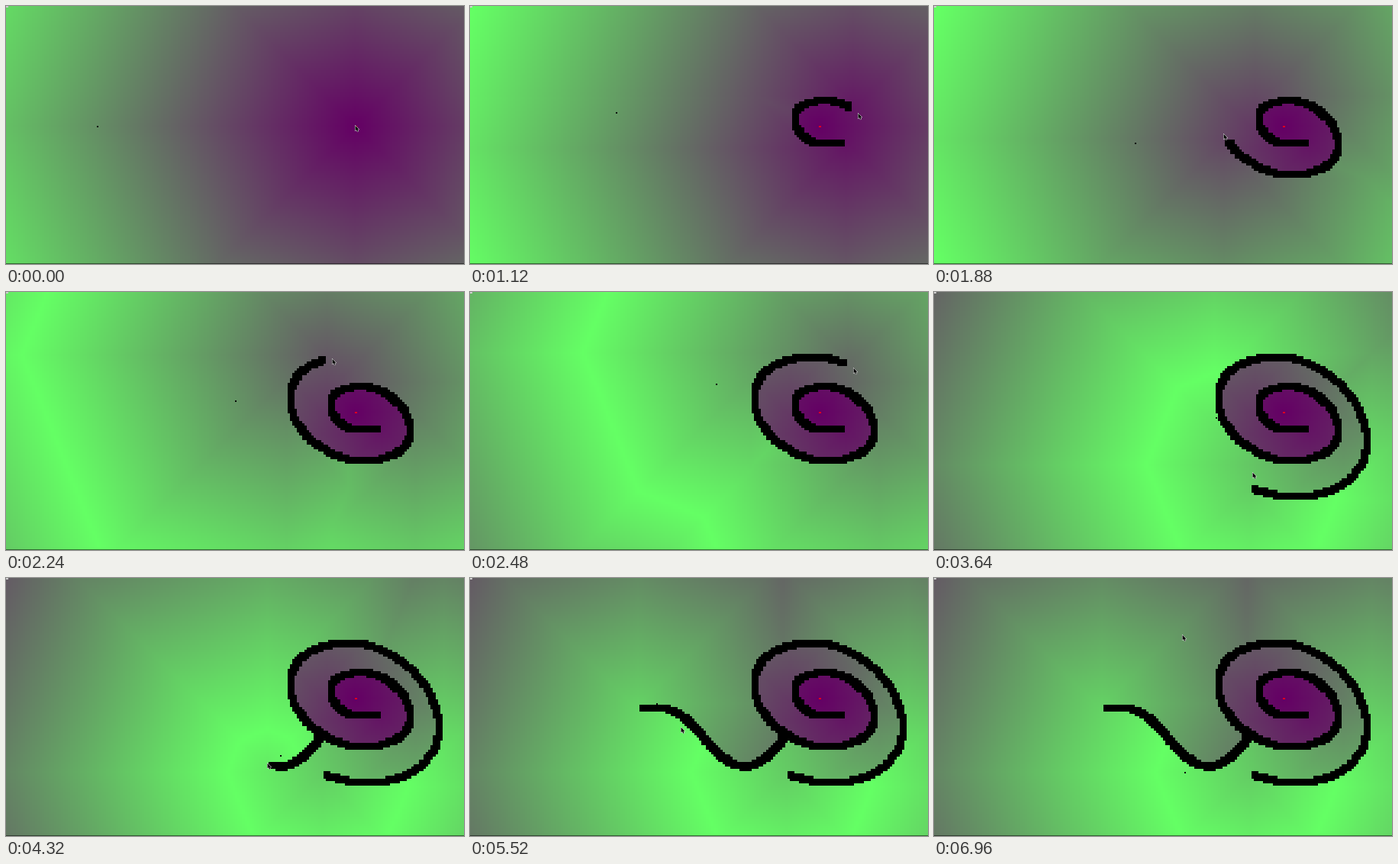
Recreate the animation shown at these times as an HTML page with a canvas. Size 600 px wide and 338 px high, loop 7 s.

```html
<!DOCTYPE html>
<html>
<head>
<meta charset="utf-8">
<style>
html, body { margin: 0; width: 100%; height: 100%; overflow: hidden; background: #000; }
canvas { display: block; }
</style>
</head>
<body>
<canvas id="stage" width="600" height="338"></canvas>
<script>
const LOOP = 7000, TICK = 40, COLS = 192, ROWS = 108, CELL = 3.125;
const GOAL = 50 * COLS + 146, START = 50 * COLS + 38;
const INK_LAG = 40, WALK_DELAY = 380, WALK_STEP = 32;
const ctx = document.getElementById('stage').getContext('2d');
const grid = document.createElement('canvas');
grid.width = COLS;
grid.height = ROWS;
const gridCtx = grid.getContext('2d');
const image = gridCtx.createImageData(COLS, ROWS);

const mix = (a, b, u) => a + (b - a) * u;

// Swings from one extreme value to the next along half cosines
function wave(extremes, pos) {
  const p = Math.min(pos, extremes.length - 1.001), i = Math.floor(p);
  return mix(extremes[i], extremes[i + 1], (1 - Math.cos((p - i) * Math.PI)) / 2);
}

const line = (x0, y0, x1, y1) => u => [mix(x0, x1, u), mix(y0, y1, u)];

function spiral(u) {
  const turn = u * 4.58;
  return [
    wave([486, 425, 530, 372, 567, 330], turn),
    wave([178, 181, 124, 221, 85, 268, 85], turn + 0.57)
  ];
}

function tail(u) {
  const x = mix(413, 226, u);
  return [x, wave([167, 247, 171], (468 - x) / 108)];
}

// Travels a curve at constant speed between two times
function leg(from, to, curve, inked = false) {
  const points = Array.from({ length: 401 }, (_, i) => curve(i / 400));
  const lengths = [0];
  for (let i = 1; i <= 400; i++) {
    const [x0, y0] = points[i - 1], [x1, y1] = points[i];
    lengths.push(lengths[i - 1] + Math.hypot(x1 - x0, y1 - y0));
  }
  const at = t => {
    const goal = lengths[400] * Math.min(1, (t - from) / (to - from));
    return points[lengths.findIndex(s => s >= goal)];
  };
  return { to, at, inked };
}

const pen = [
  leg(0, 560, line(457, 156, 486, 180)),
  leg(560, 3480, spiral, true),
  leg(3480, 3850, line(420, 258, 413, 208)),
  leg(3850, 5100, tail, true),
  leg(5100, 5520, line(226, 171, 276, 195)),
  leg(5520, 6400, line(276, 195, 325, 74))
];
const legAt = t => pen.find(l => t <= l.to) || pen[pen.length - 1];

function neighbours(cell) {
  const x = cell % COLS, y = (cell - x) / COLS, list = [];
  for (let dy = -1; dy <= 1; dy++) {
    for (let dx = -1; dx <= 1; dx++) {
      const nx = x + dx, ny = y + dy;
      if ((dx || dy) && nx >= 0 && ny >= 0 && nx < COLS && ny < ROWS)
        list.push([ny * COLS + nx, dx && dy ? 14 : 10]);
    }
  }
  return list;
}
const links = Array.from({ length: COLS * ROWS }, (_, i) => neighbours(i));

// Shortest walking distance to the goal, 10 per step and 14 per diagonal
function distances(walls) {
  const dist = new Int32Array(COLS * ROWS).fill(1e9);
  const buckets = [[GOAL]];
  dist[GOAL] = 0;
  for (let d = 0; d < buckets.length; d++) {
    for (const cell of buckets[d] || []) {
      if (dist[cell] !== d) continue;
      for (const [next, step] of links[cell]) {
        const cost = d + step;
        if (walls[next] || cost >= dist[next]) continue;
        dist[next] = cost;
        (buckets[cost] ||= []).push(next);
      }
    }
  }
  return dist;
}

let time, walls, dist, walker, steps;

function reset() {
  time = 0;
  walls = new Uint8Array(COLS * ROWS);
  dist = distances(walls);
  walker = START;
  steps = 0;
}

function addInk(from, to) {
  let changed = false;
  for (let s = Math.max(0, from); s < to; s += 4) {
    const stroke = legAt(s);
    if (!stroke.inked) continue;
    const [x, y] = stroke.at(s).map(v => Math.floor(v / CELL));
    const cell = y * COLS + x;
    walls[cell] = 1;
    for (const [next] of links[cell]) walls[next] = 1;
    changed = true;
  }
  if (changed) dist = distances(walls);
}

function advance() {
  addInk(time - INK_LAG, time + TICK - INK_LAG);
  time += TICK;
  while (WALK_DELAY + WALK_STEP * (steps + 1) <= time) {
    steps++;
    for (const [next] of links[walker]) if (dist[next] < dist[walker]) walker = next;
  }
}

function paintField() {
  for (let i = 0; i < dist.length; i++) {
    const v = dist[i] * 0.131 % 510;
    image.data[i * 4] = image.data[i * 4 + 2] = walls[i] ? 0 : 100;
    image.data[i * 4 + 1] = walls[i] ? 0 : Math.min(v, 510 - v);
    image.data[i * 4 + 3] = 255;
  }
  gridCtx.putImageData(image, 0, 0);
  ctx.imageSmoothingEnabled = false;
  ctx.drawImage(grid, 0, 0, COLS * CELL, ROWS * CELL);
}

function box(color, x, y, w, h) {
  ctx.fillStyle = color;
  ctx.fillRect(x, y, w, h);
}

function drawCursor([x, y]) {
  const arrow = new Path2D('M0 0V7L1.6 5.6 2.8 8.2 4 7.6 2.9 5.2H5Z');
  ctx.save();
  ctx.translate(Math.round(x) + 0.5, Math.round(y) + 0.5);
  ctx.strokeStyle = '#fff';
  ctx.lineWidth = 1;
  ctx.stroke(arrow);
  ctx.fillStyle = '#000';
  ctx.fill(arrow);
  ctx.restore();
}

function draw(t) {
  if (t < time) reset();
  while (time < t) advance();
  paintField();
  box('rgba(0,0,0,.5)', 0, 337, 600, 1);
  box('#ccc', 0, 0, 3, 2);
  box('#e00020', 457, 157, 3, 2);
  const col = walker % COLS, row = (walker - col) / COLS;
  box('#000', Math.round(col * CELL), Math.round(row * CELL) + 1, 2, 2);
  drawCursor(legAt(t).at(t));
}

let shown = -1;
const start = performance.now();
reset();
function frame() {
  const t = Math.floor((performance.now() - start) % LOOP / TICK) * TICK;
  if (t !== shown) draw(shown = t);
  requestAnimationFrame(frame);
}
frame();
</script>
</body>
</html>
```
